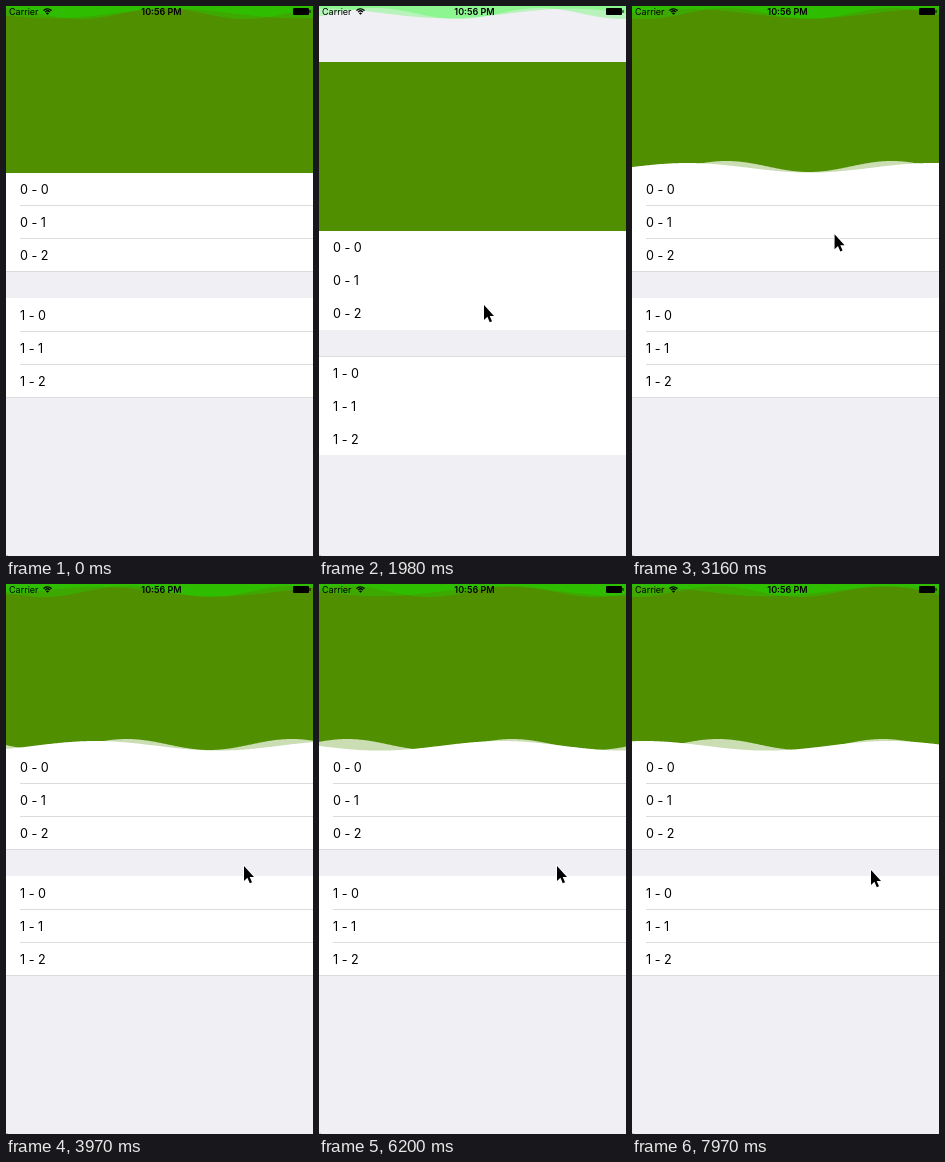
An HTML page with a canvas that plays this animation: 307 by 550 pixels, repeating every 8000 ms.

```html
<!DOCTYPE html>
<html>
<head>
<meta charset="utf-8">
<style>
html, body { margin: 0; width: 100%; height: 100%; overflow: hidden; background: #efeff4; }
canvas { display: block; }
</style>
</head>
<body>
<canvas id="stage" width="307" height="550"></canvas>
<script>
const W = 307, H = 550, LOOP = 8000;
const ctx = document.getElementById('stage').getContext('2d');
const BG = '#efeff4', GREEN = '#4f8f00', LINE = '#dcdbe0';

// Keys are [time, ...values]
const PULL = [[1280, 0], [1360, 3], [1650, 31], [1950, 58], [2080, 58], [2300, 22], [2560, 3], [2850, 0]];
const POINTER = [[140, 250, 371], [950, 151, 185], [1280, 151, 185], [1360, 152, 190], [1650, 158, 246],
  [1950, 165, 299], [2080, 165, 299], [2560, 180, 202], [2800, 184, 200], [3850, 238, 282],
  [6900, 238, 282], [7200, 239, 286]];
const FRONT = { length: 245, speed: 0.042, crest: 30, middle: 161.8, height: 4.8 };
const BACK = { length: 165, speed: 0.0325, crest: 75, middle: 160.5, height: 5.5 };

function sample(keys, t) {
  if (t <= keys[0][0]) return keys[0].slice(1);
  for (let i = 1; i < keys.length; i++) {
    const a = keys[i - 1], b = keys[i];
    if (t < b[0]) {
      const k = (t - a[0]) / (b[0] - a[0]);
      return a.slice(1).map((v, j) => v + (b[j + 1] - v) * k);
    }
  }
  return keys[keys.length - 1].slice(1);
}

function rect(color, x, y, w, h) {
  ctx.fillStyle = color;
  ctx.fillRect(x, y, w, h);
}

function text(str, x, y, font, align = 'left') {
  ctx.font = font + ' Inter, sans-serif';
  ctx.textAlign = align;
  ctx.fillStyle = '#000';
  ctx.fillText(str, x, y);
}

function waveFill(wave, t, middle, height, edge, color) {
  const crest = wave.crest + (t - 2560) * wave.speed;
  ctx.beginPath();
  ctx.moveTo(0, edge);
  for (let x = 0; x <= W; x++)
    ctx.lineTo(x, middle - height * Math.cos(2 * Math.PI * (x - crest) / wave.length));
  ctx.lineTo(W, edge);
  ctx.fillStyle = color;
  ctx.fill();
}

function drawSection(index, top, dragging) {
  rect('#fff', 0, top, W, 99);
  if (dragging) {
    if (index) rect(LINE, 0, top, W, 1);
  } else {
    rect(LINE, 14, top + 32 + (index ? 1 : 0), W, 1);
    rect(LINE, 14, top + 65 + (index ? 1 : 0), W, 1);
    rect(LINE, 0, top + 98 + (index ? 1 : 0), W, 1);
  }
  for (let row = 0; row < 3; row++)
    text(`${index} - ${row}`, 14, top + 21 + (index ? 1 : 0) + row * 33, '12.6px');
}

function drawHeader(t, pull) {
  rect(GREEN, 0, pull - 2, W, 169);
  const rise = Math.min(1, Math.max(0, (t - 2120) / 300));
  if (!rise) return;
  for (const [wave, color] of [[BACK, 'rgba(255,255,255,.7)'], [FRONT, '#fff']])
    waveFill(wave, t, 167 + pull + (wave.middle - 167) * rise, wave.height * rise, 167 + pull, color);
}

function drawStatusBar(t) {
  ctx.save();
  ctx.beginPath();
  ctx.rect(0, 0, W, 13);
  ctx.clip();
  for (const wave of [BACK, FRONT])
    waveFill(wave, t, 7.5, wave.height, 0, 'rgba(0,255,0,.23)');
  ctx.restore();

  text('Carrier', 3, 9, '9px');
  text('10:56 PM', 155.5, 9, '600 9px', 'center');

  ctx.strokeStyle = '#000';
  ctx.lineWidth = 1.3;
  for (const r of [3.2, 5.4]) {
    ctx.beginPath();
    ctx.arc(41.5, 8.2, r, -Math.PI * 0.77, -Math.PI * 0.23);
    ctx.stroke();
  }
  ctx.beginPath();
  ctx.moveTo(41.5, 8.8);
  ctx.arc(41.5, 8.8, 2.2, -Math.PI * 0.77, -Math.PI * 0.23);
  ctx.fillStyle = '#000';
  ctx.fill();

  ctx.beginPath();
  ctx.roundRect(287, 2, 16, 7, 1);
  ctx.fill();
  ctx.fillRect(303.5, 4, 1, 3);
}

function drawPointer(x, y) {
  const points = [[0, 0], [0, 15], [3.4, 11.8], [5.8, 17.2], [8, 16.3], [5.7, 11], [10, 11]];
  ctx.beginPath();
  for (const [dx, dy] of points) ctx.lineTo(x + dx, y + dy);
  ctx.closePath();
  ctx.strokeStyle = '#fff';
  ctx.lineWidth = 1.8;
  ctx.lineJoin = 'round';
  ctx.stroke();
  ctx.fillStyle = '#000';
  ctx.fill();
}

function draw(t) {
  const pull = Math.round(sample(PULL, t)[0]);
  const dragging = t >= 1300 && t < 2500;
  rect(BG, 0, 0, W, H);
  drawSection(0, 167 + pull, dragging);
  drawSection(1, 292 + pull, dragging);
  drawHeader(t, pull);
  drawStatusBar(t);
  rect('#c4c4c8', 0, H - 1, 2, 1);
  if (t >= 140) drawPointer(...sample(POINTER, t));
}

function tick() {
  draw(performance.now() % LOOP);
  requestAnimationFrame(tick);
}
tick();
</script>
</body>
</html>
```
